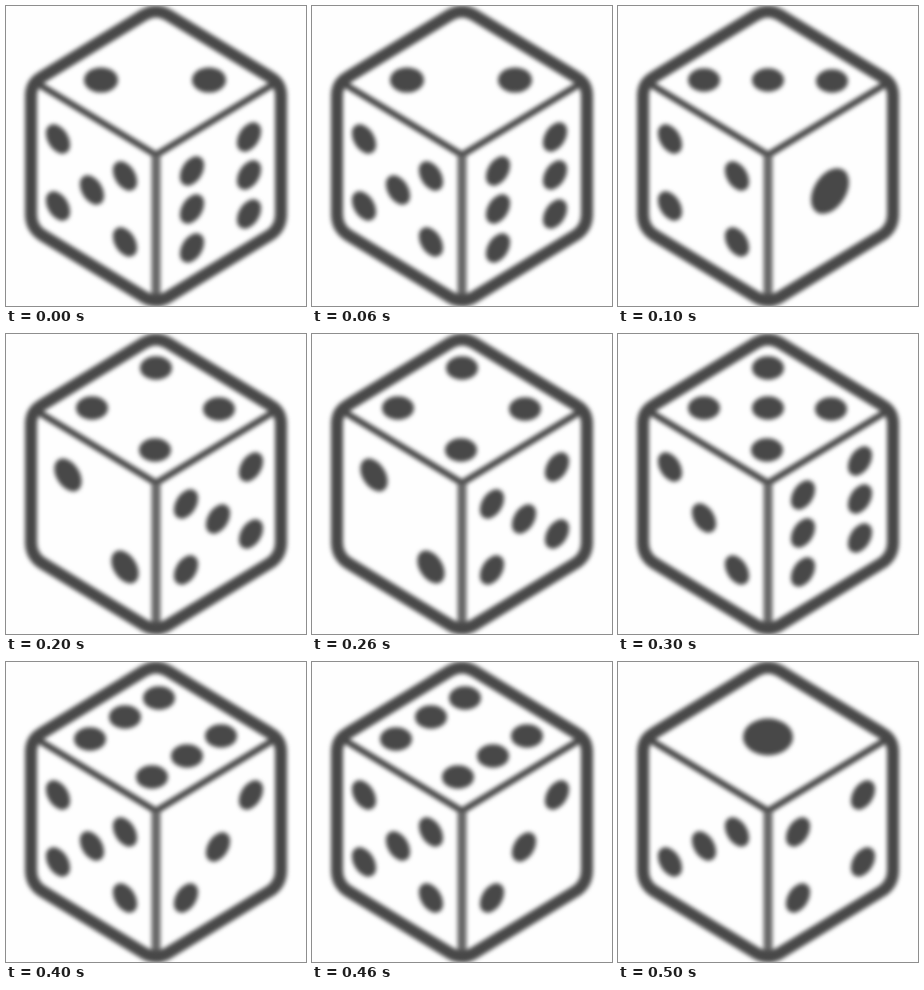
Animation of 300x300 px, one loop 0.6 s. Source, as an HTML page:

```html
<!DOCTYPE html>
<html lang="en">
<head>
<meta charset="utf-8">
<title>Rolling die</title>
<style>
html, body { margin: 0; height: 100%; overflow: hidden; background: #fefefe; }
svg { display: block; width: 100%; height: 100%; }
</style>
</head>
<body>
<svg viewBox="0 0 300 300">
  <filter id="soft" filterUnits="userSpaceOnUse" x="-20" y="-20" width="340" height="340" color-interpolation-filters="sRGB">
    <feGaussianBlur stdDeviation="2.3"/>
  </filter>
  <g filter="url(#soft)" fill="none" stroke="#484848">
    <path stroke-width="6.5" d="M29 76 150 149 271 76"/>
    <path stroke-width="9" stroke="#666" d="M150 149V296"/>
    <path stroke-width="12" d="M25 90Q25 77 36 71L138 9Q150 2 162 9L264 71Q275 77 275 90V208Q275 222 264 229L162 291Q150 298 138 291L36 229Q25 222 25 208Z"/>
    <g id="pips" fill="#484848" stroke="none"></g>
  </g>
</svg>
<script>
const pips = document.getElementById('pips');
const tilt = { top: 90, left: -32, right: 32 };

// Pips of one face: a flat list of x, y pairs and the long radius.
function face(side, points, r = 16) {
  let out = '';
  for (let i = 0; i < points.length; i += 2) {
    const [x, y] = [points[i], points[i + 1]];
    out += `<ellipse rx="${r * (side === 'top' ? 0.74 : 0.64)}" ry="${r}" transform="translate(${x} ${y}) rotate(${tilt[side]})"/>`;
  }
  return out;
}

const sixRight = (x, y) => [x, y, x, y + 38, x, y + 77, x - 57, y + 34, x - 57, y + 72, x - 57, y + 111];
const fourTop = [150, 34, 86, 74, 213, 75, 149, 116];
const fourLeft = [52, 133, 119, 170, 52, 200, 119, 236];
const fourRight = [245, 133, 180, 170, 245, 200, 180, 236];
const midLeft = [86, 184], midRight = [212, 185];

const rolls = [
  face('top', [95, 74, 203, 74], 17) + face('left', [...fourLeft, ...midLeft]) + face('right', sixRight(243, 131)),
  face('top', [86, 74, 150, 74, 214, 75]) + face('left', fourLeft) + face('right', midRight, 25),
  face('top', fourTop) + face('left', [62, 141, 119, 233], 18) + face('right', [...fourRight, ...midRight]),
  face('top', [...fourTop, 150, 74]) + face('left', [52, 133, ...midLeft, 119, 236]) + face('right', sixRight(242, 127)),
  face('top', [153, 36, 119, 55, 84, 77, 215, 74, 181, 94, 146, 115]) + face('left', [...fourLeft, ...midLeft]) + face('right', [245, 133, ...midRight, 180, 236]),
  face('top', [150, 75], 25) + face('left', [52, 200, ...midLeft, 119, 170]) + face('right', fourRight)
];

let shown = -1;
function draw(now) {
  const i = Math.floor(now / 100) % rolls.length;
  if (i !== shown) pips.innerHTML = rolls[shown = i];
}
function tick() {
  draw(performance.now() - start);
  requestAnimationFrame(tick);
}
const start = performance.now();
tick();
</script>
</body>
</html>
```
